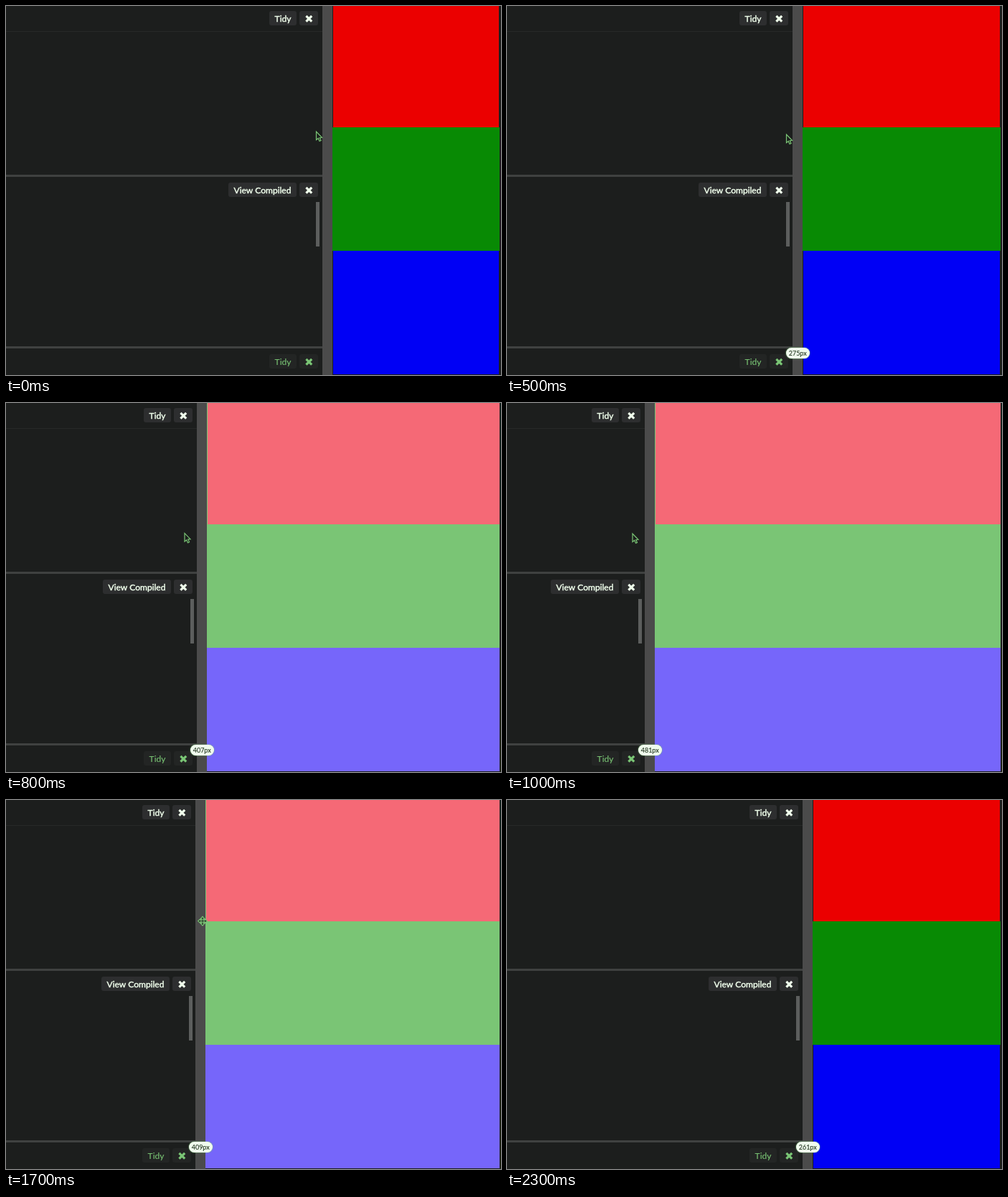
An HTML page with a canvas that plays this animation: 690x514 px, repeating every 2400 ms.

```html
<!DOCTYPE html>
<html lang="en">
<head>
<meta charset="utf-8">
<title>Resizable editor panes</title>
<style>
  html, body { margin: 0; height: 100%; overflow: hidden; background: #1c1e1d; }
  canvas { display: block; }
</style>
</head>
<body>
<canvas id="stage" width="690" height="514"></canvas>
<script>
const ctx = document.getElementById('stage').getContext('2d');
const LOOP = 2400, STEP = 100, GUTTER = 14, BREAKPOINT = 400;
const GREEN = '#7ac575', DARK = '#1c1e1d', PALE = '#f0ffec';
const NARROW = ['#eb0000', '#088a04', '#0000f5'];
const WIDE = ['#f56976', GREEN, '#7666fa'];

// The two drags of the divider, as [time, x]; each starts and ends at rest
const dragLeft = [[200, 441], [500, 398], [800, 266], [1200, 153]];
const dragRight = [[1300, 153], [1400, 164], [1700, 264], [1900, 371], [2300, 412]];

// Smooth curve through the key points
function follow(keys, t) {
  const last = keys.length - 1;
  if (t <= keys[0][0]) return keys[0][1];
  if (t >= keys[last][0]) return keys[last][1];
  const slope = i => i === 0 || i === last ? 0
    : (keys[i + 1][1] - keys[i - 1][1]) / (keys[i + 1][0] - keys[i - 1][0]);
  const i = keys.findIndex(key => key[0] > t) - 1;
  const [t0, a] = keys[i], [t1, b] = keys[i + 1];
  const span = t1 - t0, u = (t - t0) / span, v = 1 - u;
  return a * v * v * (1 + 2 * u) + b * u * u * (1 + 2 * v)
    + span * u * v * (slope(i) * v - slope(i + 1) * u);
}

function rect(x, y, w, h, color, radius = 0) {
  ctx.fillStyle = color;
  ctx.beginPath();
  ctx.roundRect(x, y, w, h, radius);
  ctx.fill();
}

function label(text, x, y, size, color, weight) {
  ctx.font = `${size}px Lato, sans-serif`;
  ctx.textAlign = 'center';
  ctx.fillStyle = ctx.strokeStyle = color;
  ctx.lineWidth = weight;
  ctx.fillText(text, x, y);
  ctx.strokeText(text, x, y);
}

// A text button and a close button, aligned to the pane's right edge
function toolbar(right, y, text, width, dim) {
  const back = dim ? '#232524' : '#2d2e2f';
  rect(right - 36 - width, y, width, 20, back, 3);
  rect(right - 32, y, 26, 20, back, 3);
  label(text, right - 36 - width / 2, y + 14.5, 12, dim ? GREEN : PALE, dim ? 0.1 : 0.45);
  const x = right - 18.7, cy = y + 10.8, r = 3.9;
  ctx.lineWidth = 3.2;
  ctx.beginPath();
  for (const side of [-r, r]) {
    ctx.moveTo(x - side, cy - r);
    ctx.lineTo(x + side, cy + r);
  }
  ctx.stroke();
}

function outline(points, x, y) {
  ctx.beginPath();
  points.forEach(([px, py]) => ctx.lineTo(x + px, y + py));
  ctx.closePath();
  ctx.fillStyle = DARK;
  ctx.strokeStyle = GREEN;
  ctx.lineWidth = 1.2;
  ctx.fill();
  ctx.stroke();
}

const arrow = [[0, 0], [0, 11.5], [2.7, 9.3], [4.5, 13.3], [6.5, 12.4], [4.8, 8.5], [8, 8.3]];
const arm = [[1, -1], [1, -3], [3, -3], [0, -6.3], [-3, -3], [-1, -3]];
const resize = [0, 3, 2, 1].flatMap(turn => arm.map(([x, y]) => {
  for (let i = 0; i < turn; i++) [x, y] = [-y, x];
  return [x, y];
}));

function drawCursor(t, edge, wide) {
  const y = Math.min(182, 175 + t / 125) - Math.max(0, t - 1400) / 22.4;
  const hovering = t >= 100 && t < 300;
  if (hovering) outline(resize, edge + 7, y);
  else if (t < 1200) outline(arrow, edge - (wide ? 17 : 8.5), y);
  else outline(resize, edge + Math.min(10, Math.max(1.5, (t - 1350) * 0.03)), y);
}

function drawPreview(left, wide) {
  const [top, middle, bottom] = wide ? WIDE : NARROW;
  const inset = wide ? 0 : 1, width = 688 - left;
  rect(left + inset, 0, width - 2 * inset, 169, top);
  rect(left, 169, width, 172, middle);
  rect(left + inset, 341, width - 2 * inset, 172, bottom);
  if (wide) rect(left, 0, 1, 169, GREEN);
}

function drawWidth(edge, width) {
  ctx.shadowColor = GREEN;
  ctx.shadowBlur = 2;
  rect(edge - 9, 476, 33, 15, '#effbed', 7.5);
  ctx.shadowColor = 'transparent';
  label(width + 'px', edge + 7.2, 486.7, 9, '#22331f', 0.1);
}

function draw(t) {
  const edge = Math.round(follow(t < 1300 ? dragLeft : dragRight, t));
  const width = 673 - edge, wide = width >= BREAKPOINT;

  rect(0, 0, 690, 514, DARK);
  rect(0, 35, edge, 1, '#272928');
  rect(0, 235, edge, 3, '#3f4140');
  rect(0, 474, edge, 3, '#3f4140');
  toolbar(edge, 7, 'Tidy', 38);
  toolbar(edge, 246, 'View Compiled', 95);
  toolbar(edge, 485, 'Tidy', 38, true);
  rect(edge - 9, 273, 5, 62, '#5c5e5d');
  rect(edge, 0, GUTTER, 514, '#4b4b4b');

  drawPreview(edge + GUTTER, wide);
  if (t >= 300) drawWidth(edge, width);
  if (t < 2300) drawCursor(t, edge, wide);
}

function frame(now) {
  draw(Math.floor(now % LOOP / STEP) * STEP);
  requestAnimationFrame(frame);
}
requestAnimationFrame(frame);
</script>
</body>
</html>
```
